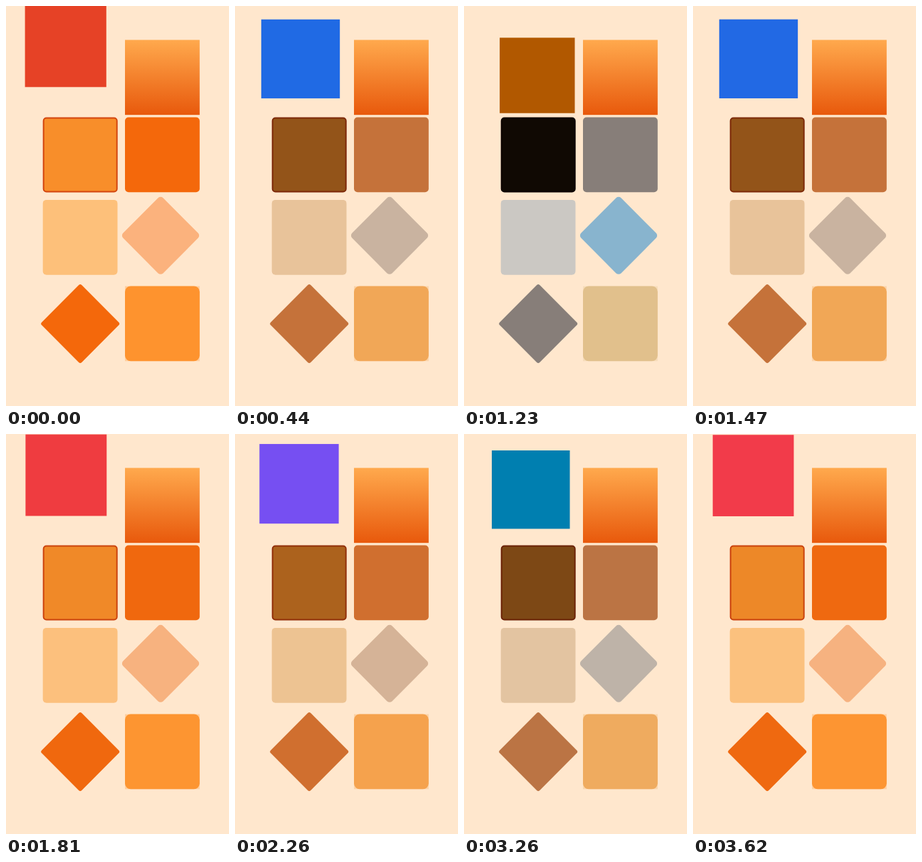
Animation, 313 px wide and 559 px high, one loop 3720 ms. Source, as an HTML page:

```html
<!DOCTYPE html>
<html lang="en">
<head>
<meta charset="utf-8">
<title>Filter swatches</title>
<style>
  html, body { margin: 0; width: 100%; height: 100%; overflow: hidden; background: #ffe7cd; }
  svg { display: block; width: 100vw; height: 100vh; }
</style>
</head>
<body>
<svg viewBox="0 0 313 559" preserveAspectRatio="none">
  <defs>
    <linearGradient id="fade" x1="0" y1="0" x2="0" y2="1">
      <stop offset="0" stop-color="#ffa94d"/>
      <stop offset="1" stop-color="#e8590c"/>
    </linearGradient>
  </defs>
  <rect width="313" height="559" fill="#ffe7cd"/>
  <rect x="167" y="47.4" width="104.8" height="104.8" fill="url(#fade)"/>
  <rect id="dark" x="52.7" y="156.5" width="103" height="103" rx="4" stroke-width="2"/>
  <rect id="flat" x="167" y="155.5" width="104.8" height="104.8" rx="5"/>
  <rect id="grey" x="51.7" y="270.9" width="104.8" height="104.8" rx="5"/>
  <rect id="flip" x="177.3" y="281.1" width="79.4" height="79.4" rx="5" transform="rotate(45 217 320.8)"/>
  <rect id="gem" x="64.5" y="404.3" width="79.4" height="79.4" rx="3" transform="rotate(45 104.2 444)"/>
  <g id="sepia">
    <rect x="167" y="391.5" width="104.8" height="104.8" opacity=".3"/>
    <rect x="167" y="391.5" width="104.8" height="104.8" rx="8"/>
  </g>
  <rect id="hue" x="-52.4" y="-52.4" width="104.8" height="104.8"/>
</svg>
<script>
const LOOP = 3720, SWING = 930;
// [start time, level the swing heads for]
const SWINGS = [[-728, 1], [202, 0], [1160, 1], [2062, 0], [2992, 1]];
const el = id => document.getElementById(id);
const rgb = c => `rgb(${c.map(v => Math.max(0, Math.min(255, Math.round(v)))).join()})`;
const mix = (a, b, k) => rgb(a.map((v, i) => v + (b[i] - v) * k));

// cubic-bezier(.25, .1, .25, 1)
function ease(x) {
  if (x <= 0) return 0;
  if (x >= 1) return 1;
  const curve = (a, b, s) => 3 * a * s * (1 - s) ** 2 + 3 * b * s * s * (1 - s) + s ** 3;
  let lo = 0, hi = 1;
  for (let i = 0; i < 24; i++) {
    const mid = (lo + hi) / 2;
    if (curve(.25, .25, mid) < x) lo = mid; else hi = mid;
  }
  return curve(.1, 1, lo);
}

function level(t) {
  // short rests at both ends of the loop
  if (t < 60) t = 0;
  if (t > 3620) t = 3620;
  const [start, goal] = SWINGS.filter(s => s[0] <= t).pop();
  const k = ease((t - start) / SWING);
  return goal ? k : 1 - k;
}

function hueRotate([r, g, b], turn) {
  const lum = .213 * r + .715 * g + .072 * b;
  const c = Math.cos(turn), s = Math.sin(turn);
  const dr = c * (r - lum) + s * (b - lum);
  const db = c * (b - lum) - s * (r - lum);
  return [lum + dr, lum - (.213 * dr + .072 * db) / .715, lum + db];
}

const black = [0, 0, 0], mid = [128, 128, 128];
const fill = (id, from, to, k) => el(id).setAttribute('fill', mix(from, to, k));

function draw(t) {
  const k = level(t);
  el('hue').setAttribute('fill', rgb(hueRotate([217, 72, 15], k * 2 * Math.PI)));
  el('hue').setAttribute('transform',
    `translate(${104.1 - 21 * k} ${99.8 - 44.9 * k}) scale(${1 + .092 * k})`);
  fill('dark', black, [255, 146, 43], k);
  el('dark').setAttribute('stroke', mix(black, [217, 72, 15], k));
  fill('flat', mid, [247, 103, 7], k);
  fill('gem', mid, [247, 103, 7], k);
  fill('grey', [200, 200, 200], [255, 192, 120], k);
  fill('flip', [128, 180, 212], [255, 178, 122], k);
  fill('sepia', [223, 195, 146], [255, 146, 43], k);
}

const began = performance.now();
function tick() {
  draw((performance.now() - began) % LOOP);
  requestAnimationFrame(tick);
}
tick();
</script>
</body>
</html>
```
